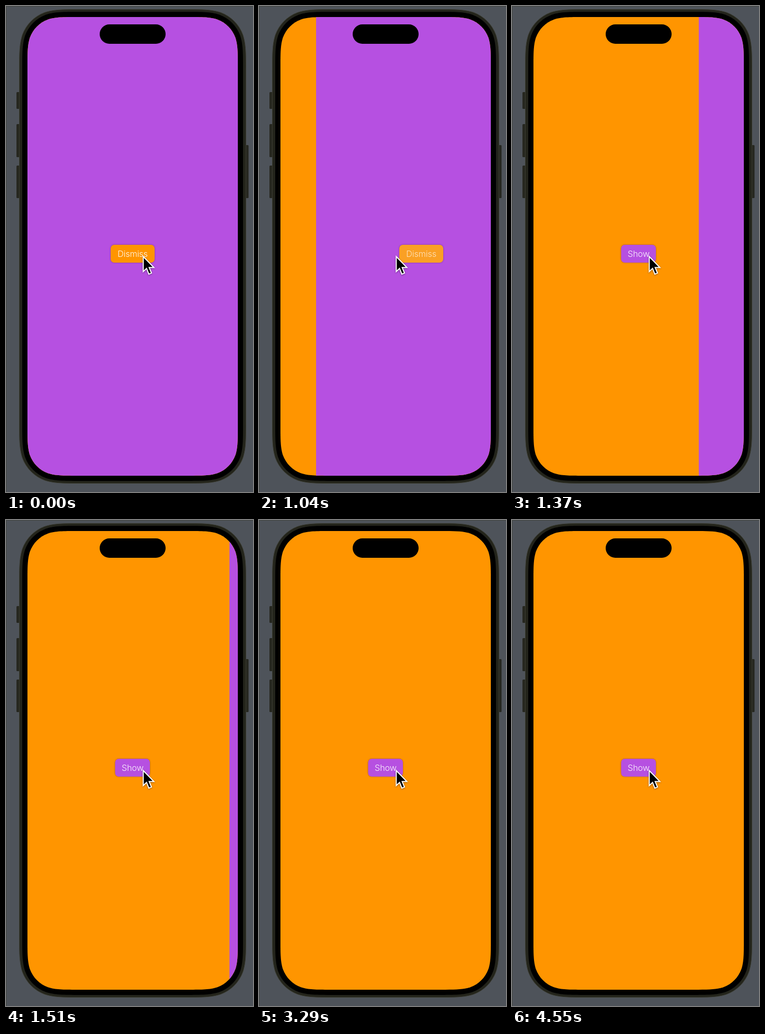
Animation of 472x926 px, one loop 4.57 s. Source, as an HTML page:

```html
<!DOCTYPE html>
<html lang="en">
<head>
<meta charset="utf-8">
<title>Slide transition</title>
<style>
  html, body { margin: 0; width: 100%; height: 100%; overflow: hidden; background: #4e535a; }
  svg { display: block; width: 472px; height: 926px; }
  text { font: 350 16.2px Inter, Roboto, sans-serif; letter-spacing: -.1px; text-anchor: middle; fill: #fff; fill-opacity: .94; }
  .button { filter: drop-shadow(0 0 1.8px rgba(0, 0, 0, .32)); }
  .cursor { filter: drop-shadow(0 1px 1.5px rgba(0, 0, 0, .4)); }
</style>
</head>
<body>
<svg viewBox="0 0 472 926">
  <defs><clipPath id="clip"><path id="screen"/></clipPath></defs>
  <path d="M.5 926V.5H472" fill="none" stroke="#41443f"/>
  <g fill="#26271f">
    <rect x="20" y="164" width="7" height="32" rx="1.5"/>
    <rect x="20" y="225" width="7" height="63" rx="1.5"/>
    <rect x="20" y="304" width="7" height="62" rx="1.5"/>
    <rect x="457" y="265" width="6.5" height="101" rx="1.5"/>
  </g>
  <path id="rim" fill="#23241b" stroke="#3a3b30"/>
  <path id="bezel" fill="#000"/>
  <g clip-path="url(#clip)">
    <rect x="41" y="21" width="402" height="874" fill="#ff9500"/>
    <g class="button">
      <rect x="208.5" y="455" width="66.5" height="34" rx="7" fill="#b650e1"/>
      <text x="242" y="478.3">Show</text>
    </g>
    <g id="cover">
      <rect x="41" y="21" width="402" height="874" fill="#b650e1"/>
      <g class="button">
        <rect id="dismiss" x="200" y="455" width="84" height="34" rx="7"/>
        <text id="label" x="242" y="478.3">Dismiss</text>
      </g>
    </g>
  </g>
  <rect x="179" y="35" width="126" height="37" rx="18.5"/>
  <path class="cursor" d="M262.3 477.5V506L268.6 500L273 510.9L278 508.8L273.6 498.3H282.6Z"
        fill="#000" stroke="#fff" stroke-width="2"/>
</svg>
<script>
  const LOOP = 4570, SLIDE_START = 1040, WIDTH = 402;
  const el = id => document.getElementById(id);
  const mix = (from, to, amount) => from + (to - from) * amount;

  // Rounded rectangle with continuous-curvature corners.
  function squircle(x, y, w, h, r) {
    const a = 1.5287, b = 1.0885, c = .8684, d = .6315, e = .0749, f = .3728, g = .1691;
    const half = [[b, 0], [c, 0], [d, e], [f, g], [g, f], [e, d], [0, c], [0, b], [0, a]];
    const mirrored = [[a, 0], ...half].reverse().slice(1);
    const corner = (points, right, bottom) => 'C' + points.map(([p, q]) =>
      `${right ? x + w - p * r : x + p * r} ${bottom ? y + h - q * r : y + q * r}`).join(' ');
    return `M${x + a * r} ${y}H${x + w - a * r}` + corner(half, true, false) +
      `V${y + h - a * r}` + corner(mirrored, true, true) +
      `H${x + a * r}` + corner(half, false, true) +
      `V${y + a * r}` + corner(mirrored, false, false) + 'Z';
  }

  el('rim').setAttribute('d', squircle(25.5, 6.5, 433, 903, 77));
  el('bezel').setAttribute('d', squircle(31, 11, 422, 894, 72));
  el('screen').setAttribute('d', squircle(41, 21, WIDTH, 874, 62));

  // The slide advances in triplets: two short holds of 20 ms, then one of 100 ms.
  function slideStep(t) {
    const s = Math.max(0, t - SLIDE_START - 10);
    return 3 * Math.floor(s / 140) + Math.min(2, Math.floor(s % 140 / 20));
  }

  function draw(now) {
    const t = now % LOOP;
    let offset = 0, press = 0;
    if (t >= SLIDE_START) {
      const step = slideStep(t);
      const u = Math.min(1, .27 + .04826 * step + .000588 * step * step);
      offset = WIDTH * (1 - Math.cos(Math.PI * u)) / 2;
      press = Math.max(0, 1 - step / 5);
    }
    el('cover').setAttribute('transform', `translate(${offset.toFixed(2)} 0)`);
    el('dismiss').setAttribute('fill',
      `rgb(${mix(255, 250, press)}, ${mix(149, 160, press)}, ${mix(0, 36, press)})`);
    el('label').style.fillOpacity = mix(.94, .7, press);
    requestAnimationFrame(draw);
  }
  draw(0);
</script>
</body>
</html>
```
